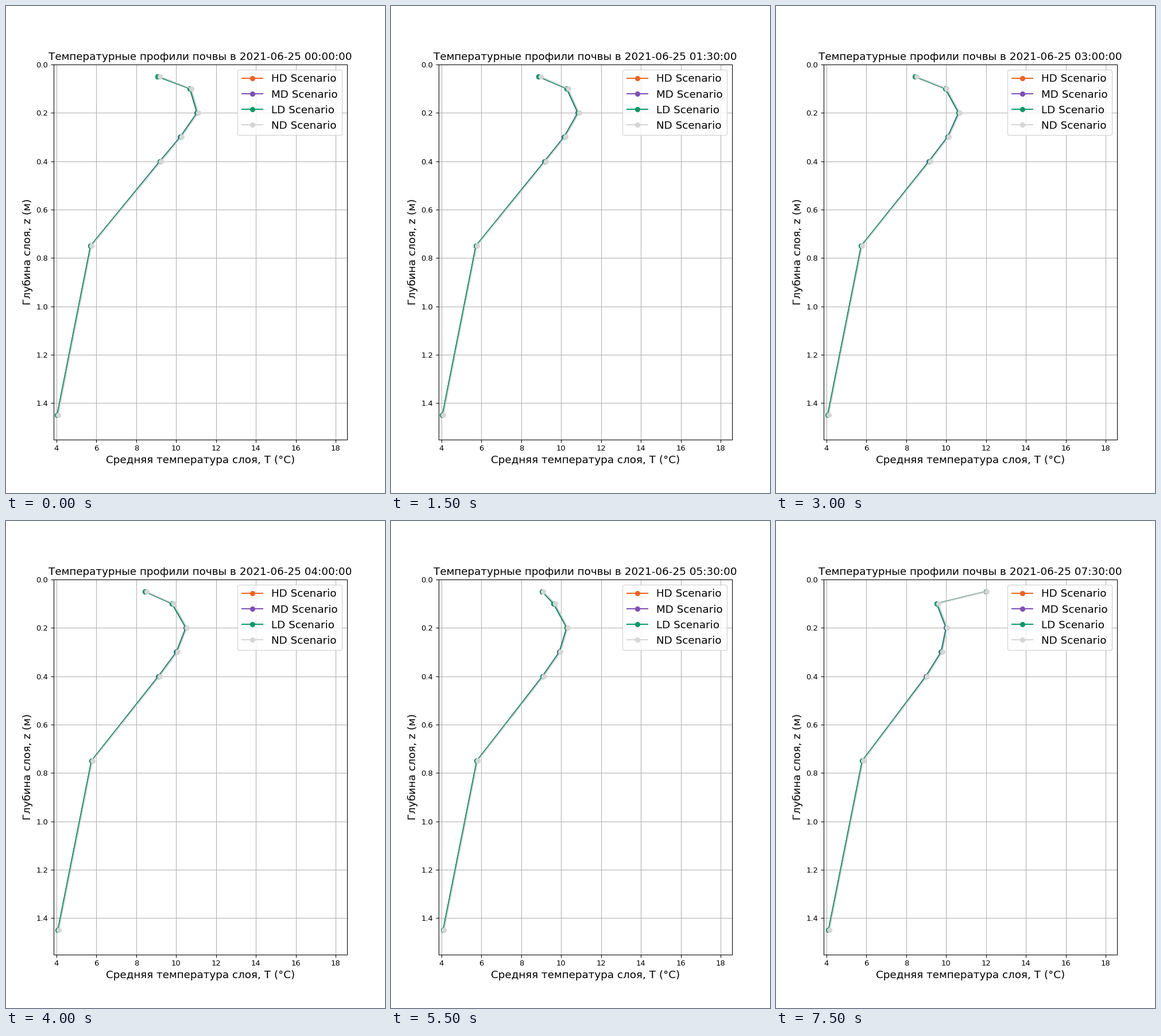
Write a matplotlib script that moves like this. It is 660 px wide and 849 px high and loops after 8 s.

```python
import numpy as np
import matplotlib.pyplot as plt
from matplotlib.animation import FuncAnimation

DPI = 660 / 7
FRAMES, STEP_MS = 16, 500

plt.rcParams["font.family"] = "DejaVu Sans"

depth = np.array([0.05, 0.1, 0.2, 0.3, 0.4, 0.75, 1.45])


def nd_profile(t):
    """Soil temperature by depth at hour t, without the scenario cooling."""
    sunrise = 4.85 * np.exp(0.7 * (t - 7.5))
    return np.array([
        9.17 - 0.25 * t + 0.12 * np.sin(1.4 * t) + sunrise,
        10.77 - 0.305 * t + 0.02 * t ** 2,
        11.11 - 0.14 * t,
        10.27 - 0.035 * t - 0.0035 * t ** 2,
        9.25 - 0.008 * t - 0.0025 * t ** 2,
        5.76 + 0.011 * t,
        4.08 + 0.009 * t,
    ])


def profiles(t):
    """HD, MD, LD and ND temperatures; LD is cooler, mostly near the surface."""
    nd = nd_profile(t)
    gap = 0.05 + 0.03 * (depth <= 0.1)
    gap[0] = 0.13 - 0.013 * t
    ld = nd - gap
    mid = (depth > 0.1) & (depth < 0.5)
    return ld - 0.008 * mid, ld - 0.018 * mid, ld, nd


fig, ax = plt.subplots(figsize=(7, 9.005), dpi=DPI)
fig.subplots_adjust(left=0.125, right=0.9, bottom=0.11, top=0.88)

runs = [("HD", "#eb6424"), ("MD", "#7d4fb5"), ("LD", "#0c9967"), ("ND", "#d6d6d6")]
lines = [ax.plot([], [], "o-", color=c, label=f"{name} Scenario")[0]
         for name, c in runs]

ax.set_xlim(3.843, 18.575)
ax.set_ylim(1.55, 0)
ax.set_xticks(range(4, 19, 2))
ax.set_yticks(np.arange(0, 1.5, 0.2))
ax.grid(True)
ax.set_xlabel("Средняя температура слоя, T (°C)", fontsize=14)
ax.set_ylabel("Глубина слоя, z (м)", fontsize=14)
ax.legend(loc="upper right", fontsize=14)
title = ax.set_title("", fontsize=14)


def update(k):
    for line, temp in zip(lines, profiles(k / 2)):
        line.set_data(temp, depth)
    title.set_text("Температурные профили почвы в "
                   f"2021-06-25 {k // 2:02d}:{k % 2 * 30:02d}:00")
    return lines + [title]


anim = FuncAnimation(fig, update, frames=FRAMES, interval=STEP_MS,
                     repeat=True, repeat_delay=0, blit=False)
plt.show()
```
